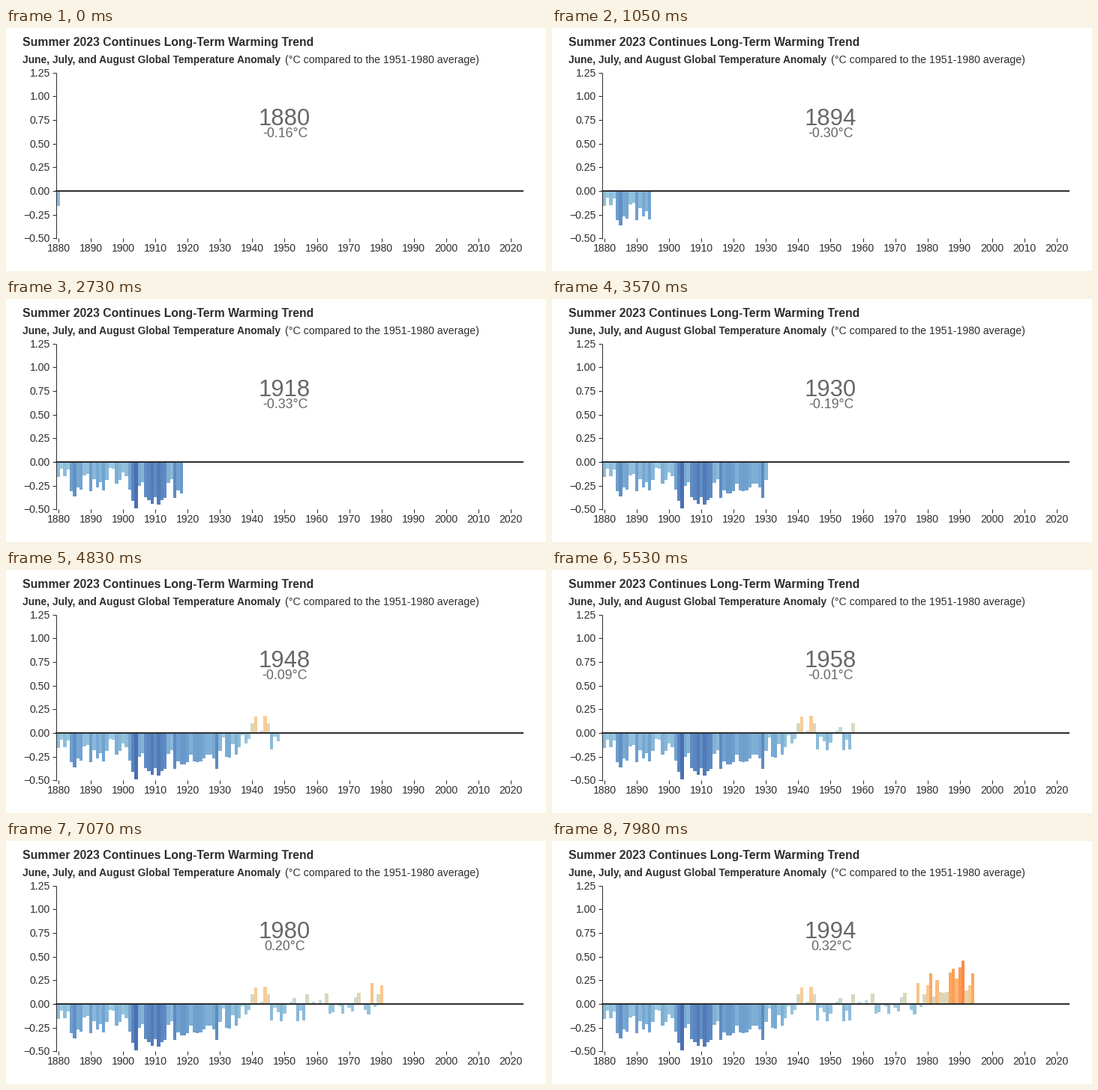
These frames come from a looping animation (720x325 px, 8000 ms). A matplotlib script:

```python
import numpy as np
import matplotlib.pyplot as plt
from matplotlib.animation import FuncAnimation

W, H, DPI = 720, 325, 100
LOOP, TICK, STEP = 8000, 20, 70  # ms
FIRST = 1880
X0, DX = 70, 4.307               # first bar centre, pixels per year
Y0, DY = 218, 126.6              # zero line, pixels per degree
INK, GREY = "#2d2d2f", "#67676a"

# June-August anomaly in hundredths of a degree, one row per decade
ANOMALY = np.array([
    -16, -7, -15, -8, -31, -36, -27, -29, -14, -13,
    -31, -18, -27, -21, -30, -19, -6, -7, -23, -19,
    -11, -15, -29, -41, -49, -25, -21, -37, -40, -44,
    -37, -45, -40, -38, -22, -18, -38, -30, -33, -33,
    -31, -23, -30, -31, -30, -27, -23, -23, -27, -38,
    -19, -5, -25, -26, -12, -23, -15, -2, -11, -6,
    10, 17, 1, 2, 18, 10, -17, -4, -9, -18,
    -10, 0, 2, 6, -18, -7, -17, 10, -1, 2,
    -1, 4, 0, 11, -10, -9, 1, -2, -10, 1,
    -4, -8, 7, 12, -1, -6, -11, 22, -3, 10,
    20, 32, 8, 25, 13, 12, 13, 33, 37, 27,
    39, 46, 14, 20, 32,
]) / 100

RAMP = [
    (-0.49, "#4a70b3"), (-0.36, "#6290c5"), (-0.30, "#70a2cf"),
    (-0.16, "#8dbcdb"), (-0.05, "#9acae0"), (0.04, "#bbdcd9"),
    (0.10, "#d6d9bf"), (0.14, "#e3d3b0"), (0.18, "#fbcb94"),
    (0.25, "#fcbc7a"), (0.32, "#fca85d"), (0.46, "#fb8a48"),
]


def shade(value):
    stops = [v for v, _ in RAMP]
    rgb = np.array([plt.matplotlib.colors.to_rgb(c) for _, c in RAMP])
    return [np.interp(value, stops, rgb[:, k]) for k in range(3)]


plt.rcParams["font.family"] = "Liberation Sans"
fig = plt.figure(figsize=(W / DPI, H / DPI), dpi=DPI, facecolor="white")
ax = fig.add_axes([0, 0, 1, 1])
ax.set_xlim(0, W)
ax.set_ylim(H, 0)
ax.axis("off")


def text(x, y, s, px, color=INK, **kw):
    return ax.text(x, y, s, fontsize=px * 72 / DPI, color=color,
                   va="baseline", **kw)


def line(xs, ys, px):
    ax.plot(xs, ys, color=INK, lw=px * 72 / DPI,
            solid_capstyle="butt", zorder=3)


text(22, 24, "Summer 2023 Continues Long-Term Warming Trend", 15.7,
     weight="bold")
text(22, 47, "June, July, and August Global Temperature Anomaly", 13.75,
     weight="bold")
text(372, 47, "(°C compared to the 1951-1980 average)", 14.1)

line([66.5, 66.5], [60, 282], 1)
for k in range(-2, 6):
    y = Y0 - k * DY / 4
    line([62, 66.5], [y, y], 1)
    label = f"{k / 4:.2f}".replace("-", "\u2212")
    text(59, y + 5, label, 14, ha="right")
for year in range(FIRST, 2021, 10):
    x = X0 + (year - FIRST) * DX
    line([x, x], [281, 286], 1)
    text(x, 299, str(year), 14, ha="center")
line([66, 690], [Y0, Y0], 2)

centres = X0 + DX * np.arange(len(ANOMALY))
bars = ax.bar(centres, -ANOMALY * DY, DX, bottom=Y0, linewidth=0,
              color=[shade(v) for v in ANOMALY], zorder=2)
ax.set_xlim(0, W)
ax.set_ylim(H, 0)

year_text = text(371.5, 130.5, "", 31, GREY, ha="center")
value_text = text(372, 146.5, "", 17.8, GREY, ha="center")


def draw(frame):
    now = min(frame * TICK // STEP, len(ANOMALY) - 1)
    for i, bar in enumerate(bars):
        bar.set_visible(i <= now)
    year_text.set_text(str(FIRST + now))
    value_text.set_text(f"{ANOMALY[now]:.2f}°C")
    return [*bars, year_text, value_text]


anim = FuncAnimation(fig, draw, frames=LOOP // TICK, interval=TICK,
                     init_func=lambda: draw(0), repeat=True, repeat_delay=0)
plt.show()
```
